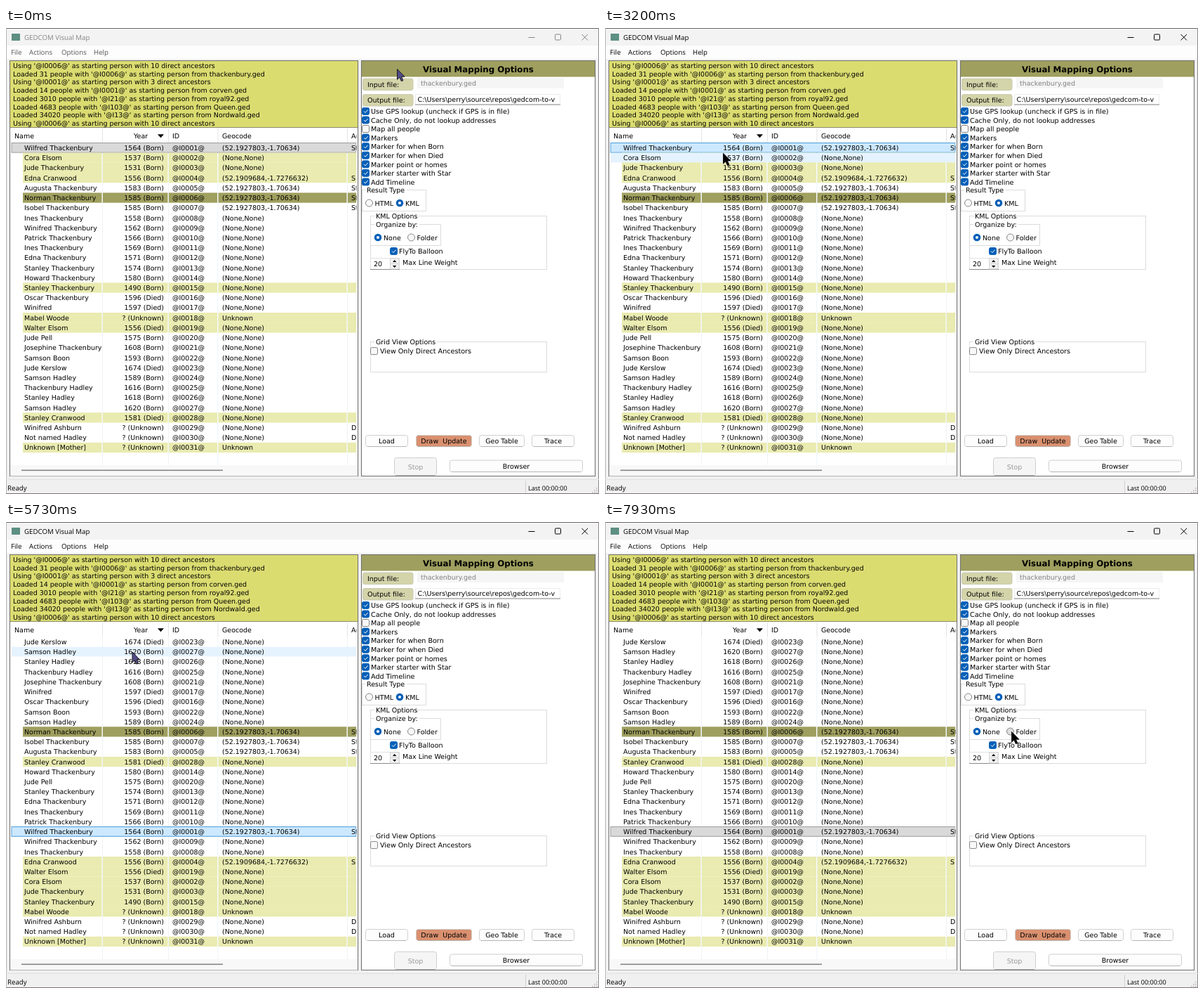
Write an HTML page that moves like this. It is 845 by 663 pixels and loops after 8 s.

```html
<!DOCTYPE html>
<html lang="en">
<head>
<meta charset="utf-8">
<title>GEDCOM Visual Map</title>
<style>
html, body { margin: 0; width: 845px; height: 663px; overflow: hidden; background: #f0f0f0; }
svg { display: block; --ink: #858585; --menu: #555; }
svg.active { --ink: #000; --menu: #000; }
text { font: 9.5px "DejaVu Sans", sans-serif; white-space: pre; text-rendering: geometricPrecision; }
.ui { font-family: "Open Sans", sans-serif; font-size: 9.7px; }
.title { fill: var(--ink); }
.menu { fill: var(--menu); }
.control { fill: none; stroke: var(--ink); }
.check { font-size: 9.6px; }
.big { font: bold 11.8px "DejaVu Sans", sans-serif; }
.mid { text-anchor: middle; }
.end { text-anchor: end; }
</style>
</head>
<body>
<svg id="stage" width="845" height="663" viewBox="0 0 845 663">
  <clipPath id="listClip"><rect x="6" y="142" width="493.5" height="480"/></clipPath>
  <clipPath id="fieldClip"><rect x="583" y="94" width="206" height="16"/></clipPath>
</svg>
<script>
const stage = document.getElementById('stage');
const OLIVE = '#9f9f5f', PALE = '#e9ebb0', LOG = '#dbdc70', BLUE = '#005fb8', KHAKI = '#d4d4aa';

function add(tag, attrs, parent = stage) {
  const el = document.createElementNS('http://www.w3.org/2000/svg', tag);
  for (const k in attrs) el.setAttribute(k, attrs[k]);
  parent.appendChild(el);
  return el;
}
const rect = (x, y, width, height, fill, more, parent) =>
  add('rect', { x, y, width, height, fill, ...more }, parent);
const path = (d, more, parent) => add('path', { d, ...more }, parent);
// Text is placed by the middle of its capitals.
function text(x, cy, s, more, parent) {
  const el = add('text', { x, y: cy + 3.5, ...more }, parent);
  el.textContent = s;
  return el;
}

// Window frame
rect(0, 0, 845, 663, '#f0f0f0');
rect(0, 0, 845, 25, '#f3f3f3');
rect(0, 25, 845, 19, '#fdfdfd');
rect(0, 0, 845, 1, '#6a6468');
rect(0, 0, 1, 663, '#b9b5b8');
rect(844, 0, 1, 663, '#8d858b');
rect(0, 662, 845, 1, '#7b7076');
rect(8, 8, 12, 10, '#5d8f83');
text(26, 13.3, 'GEDCOM Visual Map', { class: 'ui title' });
[[7, 'File'], [33, 'Actions'], [79, 'Options'], [125, 'Help']]
  .forEach(([x, s]) => text(x, 34.3, s, { class: 'ui menu' }));
path('M744.5 13.5h9', { class: 'control' });
rect(782.5, 9, 8, 8, 'none', { rx: 1.2, class: 'control' });
path('M820.5 9l8.5 8.5m0-8.5l-8.5 8.5', { class: 'control' });

// Status bar
rect(0, 642, 845, 1, '#e2e2e2');
text(2, 654, 'Ready', { class: 'ui' });
rect(740, 644, 1, 18, '#d0d0d0');
text(744, 654, 'Last 00:00:00', { class: 'ui', style: 'font-size:9.1px' });
for (let i = 0; i < 3; i++)
  for (let j = 0; j <= i; j++) rect(841 - 3 * j, 654 + 3 * i, 1.5, 1.5, '#b5b5b5');

// Left panel
rect(5.5, 46.5, 496, 591, '#fff', { stroke: '#707070' });
rect(6, 47, 495, 94, LOG);
rect(6, 141, 495, 1, '#8c8c70');
const start = (id, end) => `'@${id}@' as starting person ${end}`;
[
  'Using ' + start('I0006', 'with 10 direct ancestors'),
  'Loaded 31 people with ' + start('I0006', 'from thackenbury.ged'),
  'Using ' + start('I0001', 'with 3 direct ancestors'),
  'Loaded 14 people with ' + start('I0001', 'from corven.ged'),
  'Loaded 3010 people with ' + start('I21', 'from royal92.ged'),
  'Loaded 4683 people with ' + start('I103', 'from Queen.ged'),
  'Loaded 34020 people with ' + start('I13', 'from Nordwald.ged'),
  'Using ' + start('I0006', 'with 10 direct ancestors')
].forEach((s, i) => text(10, 53.5 + 11.7 * i, s));
rect(6, 622, 495, 15.5, '#f8f8f8');
rect(22, 628.5, 287, 1.6, '#868686');

// Table
const list = add('g', { 'clip-path': 'url(#listClip)' });
const COLS = [[24, 136.5], [138, 230.5], [232, 301], [302.5, 485.5], [487, 499.5]];
const ROW_TOP = 163.3, ROW_H = 14.217;
const headFill = COLS.map(([a, b], i) => rect(i ? a - .5 : 7, 143, b - a + 1 + (i ? 0 : 17), 20, '#fff', {}, list));
[137, 231, 301.5, 486].forEach(x => {
  rect(x, 143, 1, 20, '#e2e4e6', {}, list);
  rect(x, 163, 1, 460, '#eef3f7', {}, list);
});
[[12, 'Name'], [237, 'ID'], [308, 'Geocode'], [492, 'Address']]
  .forEach(([x, s]) => text(x, 153.3, s, {}, list));
const yearHead = add('g', {}, list);
text(182, 153.3, 'Year', {}, yearHead);
const arrow = path('', {}, yearHead);

const T = ' Thackenbury', H = ' Hadley';
const people = [
  'Wilfred' + T, 'Cora Elsom', 'Jude' + T, 'Edna Cranwood', 'Augusta' + T, 'Norman' + T,
  'Isobel' + T, 'Ines' + T, 'Winifred' + T, 'Patrick' + T, 'Ines' + T, 'Edna' + T,
  'Stanley' + T, 'Howard' + T, 'Stanley' + T, 'Oscar' + T, 'Winifred', 'Mabel Woode',
  'Walter Elsom', 'Jude Pell', 'Josephine' + T, 'Samson Boon', 'Jude Kerslow', 'Samson' + H,
  'Thackenbury' + H, 'Stanley' + H, 'Samson' + H, 'Stanley Cranwood', 'Winifred Ashburn',
  'Not named' + H, 'Unknown [Mother]'
];
const years = [1564, 1537, 1531, 1556, 1583, 1585, 1585, 1558, 1562, 1566, 1569, 1571, 1574, 1580, 1490,
  1596, 1597, 0, 1556, 1575, 1608, 1593, 1674, 1589, 1616, 1618, 1620, 1581, 0, 0, 0];
const died = [16, 17, 19, 23, 28], ancestors = [2, 3, 4, 15, 18, 19, 28, 31];
const home = [1, 5, 6, 7], SELF = 6, SELECTED = 1;

const rows = people.map((name, i) => {
  const id = i + 1, year = years[i], g = add('g', {}, list);
  const fill = id === SELF ? OLIVE : ancestors.includes(id) ? PALE : '';
  if (fill) COLS.forEach(([a, b]) => rect(a, 0, b - a, ROW_H + .05, fill, {}, g));
  const cover = rect(8, .2, 491, ROW_H - .6, 'none', {}, g);
  const cell = (x, s, more) => text(x, 7.2, s, more, g);
  cell(26, name);
  cell(225, year ? `${year} (${died.includes(id) ? 'Died' : 'Born'})` : '? (Unknown)', { class: 'end' });
  cell(237, `@I${String(id).padStart(4, '0')}@`);
  cell(308, home.includes(id) ? '(52.1927803,-1.70634)' : id === 4 ? '(52.1909684,-1.7276632)'
    : id === 18 || id === 31 ? 'Unknown' : '(None,None)');
  if (home.includes(id)) cell(492, 'St');
  if (id === 4) cell(492, 'S');
  if (id === 29 || id === 30) cell(492, 'D');
  return { id, year, g, cover };
});
const orders = {
  id: rows,
  up: [...rows].sort((a, b) => a.year - b.year),
  down: [...rows].sort((a, b) => b.year - a.year)
};

// Right panel
rect(506.5, 46.5, 333, 591, '#fff', { stroke: '#707070' });
rect(507, 47, 332, 22.5, OLIVE);
text(673, 59, 'Visual Mapping Options', { class: 'big mid' });

function button(x, y, w, h, s, fill = '#fdfdfd', ink = '#000') {
  const el = rect(x + .5, y + .5, w - 1, h - 1, fill, { rx: 3, stroke: '#cfcfcf' });
  path(`M${x + 3} ${y + h - .5}h${w - 6}`, { stroke: '#b4b4b4' });
  text(x + w / 2, y + h / 2 + .2, s, { class: 'mid', fill: ink });
  return el;
}
const fileButtons = [['Input file:', 71.5], ['Output file:', 94]].map(([s, y]) => {
  const el = rect(508.5, y + .5, 71.5, 16.5, KHAKI, { rx: 2.5, stroke: '#c9c9b4' });
  text(515, y + 8.7, s);
  return { el, y };
});
rect(586, 71, 209, 15, '#f5f5f5');
text(591, 78.7, 'thackenbury.ged', { fill: '#808080' });
rect(583.5, 94.5, 206, 14.5, '#fff', { stroke: '#ececec' });
rect(583, 108.5, 207, 1, '#8a8a8a');
text(586.5, 101.5, 'C:\\Users\\perry\\source\\repos\\gedcom-to-v', { 'clip-path': 'url(#fieldClip)' });

function check(x, cy, s, on = true, gap = 13) {
  rect(x + .5, cy - 5, 10, 10, on ? BLUE : '#f8f8f8', { rx: 2, stroke: on ? BLUE : '#777', 'stroke-width': .9 });
  if (on) path(`M${x + 3} ${cy}l2 2.1 3.6-4`, { fill: 'none', stroke: '#fff', 'stroke-width': 1 });
  text(x + gap, cy + .3, s, { class: 'check' });
}
function radio(cx, cy, s, on) {
  const dot = add('circle', { cx, cy, r: on ? 3.7 : 5, fill: '#f8f8f8', stroke: on ? BLUE : '#777', 'stroke-width': on ? 3.2 : .9 });
  text(cx + 8, cy + .3, s);
  return dot;
}
function group(x, y, w, h, labelX, s, labelW) {
  rect(x + .5, y + .5, w, h, 'none', { stroke: '#dcdcdc' });
  rect(labelX - 2, y - 1, labelW, 3, '#fff');
  text(labelX, y + .8, s);
}
['Use GPS lookup (uncheck if GPS is in file)', 'Cache Only, do not lookup addresses', 'Map all people',
  'Markers', 'Marker for when Born', 'Marker for when Died', 'Marker point or homes',
  'Marker starter with Star', 'Add Timeline'
].forEach((s, i) => check(507, 118.4 + 12.56 * i, s, i !== 2));

group(507, 230, 91, 30, 514, 'Result Type', 59);
radio(517.5, 249, 'HTML', false);
radio(561, 249, 'KML', true);
group(519, 267, 251, 76, 527, 'KML Options', 62);
group(519, 279, 100, 30, 527, 'Organize by:', 64);
radio(530, 298, 'None', true);
const folder = radio(577.5, 298, 'Folder', false);
check(547, 317.5, 'FlyTo Balloon');
rect(519.5, 327.5, 41, 16, '#fff', { stroke: '#e2e2e2' });
rect(519, 343, 42, 1, '#8a8a8a');
text(524, 335.5, '20');
[328, 336].forEach(y => rect(547.5, y, 12.5, 7, '#f3f3f3', { stroke: '#cfcfcf', 'stroke-width': .8 }));
path('M551 333h5.4l-2.7-3zM551 338h5.4l-2.7 3z');
text(565, 333, 'Max Line Weight');
group(519, 446, 251, 43, 527, 'Grid View Options', 89);
check(519, 459.6, 'View Only Direct Ancestors', false, 14);

button(512, 579, 61, 17, 'Load');
button(584, 579, 80, 17, 'Draw  Update', '#d9906f');
button(674, 579, 65, 17, 'Geo Table');
button(749, 579, 61, 17, 'Trace');
button(553, 611, 61, 26, 'Stop', '#f5f5f5', '#9a9a9a');
button(632, 614.5, 190, 17.5, 'Browser');

const cursor = path('M.5.5V15.3L3.9 12.2 6.4 17.7 8.9 16.6 6.5 11.2H11Z',
  { stroke: '#111', 'stroke-width': .9, 'stroke-linejoin': 'round' });

// Motion: [tick, x, y], 120 ticks to a loop
const LOOP = 8000, TICK = LOOP / 120;
const route = [
  [0, 557, 58], [4, 558, 78], [12, 558, 78], [16, 563, 108], [18, 566, 122], [20, 555, 106], [22, 555, 106],
  [24, 343, 164.5], [28, 210, 193], [32, 168, 169], [47, 168, 169], [48, 168, 177.7], [52, 170, 172],
  [56, 173, 154], [64, 173, 154], [67, 231, 156], [71, 231, 156], [80, 171, 156], [84, 171, 156],
  [88, 188, 213], [91, 188, 213], [96, 285, 291], [102, 698, 309], [104, 671, 290], [110, 620, 273],
  [117, 579, 298], [120, 579, 298]
];
function locate(k) {
  const i = route.findIndex((p, n) => n && k <= p[0]);
  const [k0, x0, y0] = route[i - 1], [k1, x1, y1] = route[i];
  const f = (k - k0) / (k1 - k0);
  return [x0 + (x1 - x0) * f, y0 + (y1 - y0) * f];
}
const within = (k, a, b) => k >= a && k < b;

function draw(k) {
  const [x, y] = locate(k);
  const active = k >= 39, focused = within(k, 39, 118);
  const pressed = within(k, 58, 60) || within(k, 81, 83);
  const sort = k < 60 ? 'id' : k < 83 ? 'up' : 'down';
  const inList = x >= 7 && x < 500;
  const onHead = inList && y >= 143 && y < 165;
  const hoverRow = inList && !onHead ? Math.floor((y - ROW_TOP) / ROW_H) : -1;

  stage.classList.toggle('active', active);
  headFill.forEach((el, i) => {
    const left = i ? COLS[i][0] - 1 : 7;
    const hot = onHead && x >= left && x < COLS[i][1] + .6;
    el.setAttribute('fill', hot ? pressed ? '#bcdcf4' : '#d9ebf9' : '#fff');
  });
  yearHead.setAttribute('transform', pressed ? 'translate(1 .5)' : 'translate(0 0)');
  arrow.setAttribute('d', sort === 'up' ? 'M216 155.5h9l-4.5-5z' : 'M216 151.2h9l-4.5 5z');

  orders[sort].forEach((row, i) => {
    row.g.setAttribute('transform', `translate(0 ${ROW_TOP + ROW_H * i})`);
    const [fill, line] = row.id === SELECTED ? focused ? ['#cce8ff', '#4c9dd8'] : ['#d9d9d9', '#9c9c9c']
      : i === hoverRow ? ['#e5f3ff', 'none'] : ['none', 'none'];
    row.cover.setAttribute('fill', fill);
    row.cover.setAttribute('stroke', line);
  });

  fileButtons.forEach(({ el, y: top }) => {
    const hot = x >= 508 && x < 581 && y >= top && y < top + 17.5;
    el.setAttribute('fill', hot ? '#e6e6cc' : KHAKI);
  });
  folder.setAttribute('fill', k >= 118 ? '#dedede' : '#f8f8f8');

  const tinted = k < 23 || within(k, 35, 39) || within(k, 85, 105);
  cursor.setAttribute('fill', tinted ? '#514c86' : '#000');
  cursor.setAttribute('transform', `translate(${x} ${y})`);
}
function frame(now) {
  draw(Math.floor((now % LOOP + 4) / TICK) % 120);
  requestAnimationFrame(frame);
}
draw(0);
requestAnimationFrame(frame);
</script>
</body>
</html>
```
